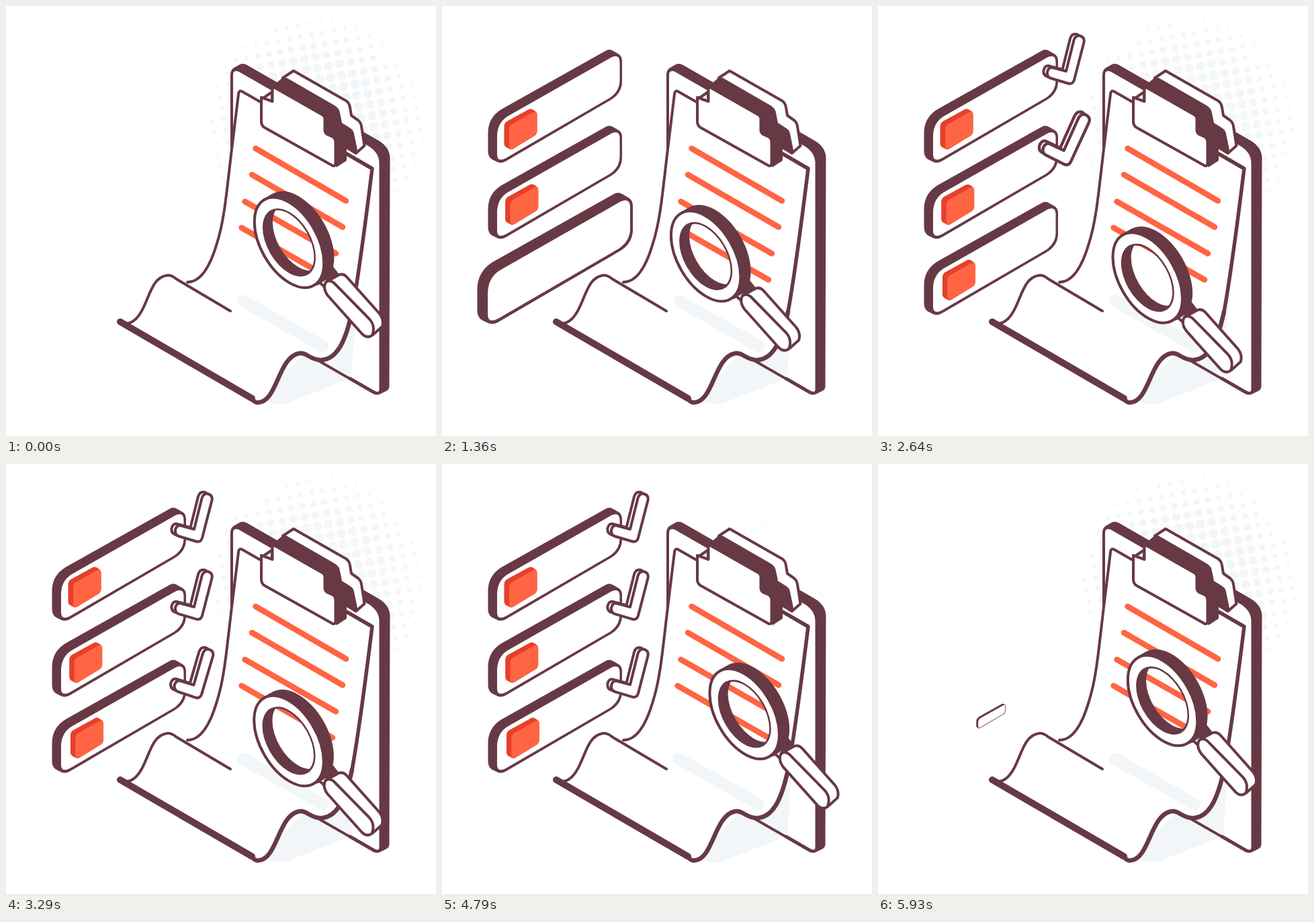
An HTML page that plays this animation: 640 by 640 pixels, repeating every 6000 ms.

```html
<!DOCTYPE html>
<html lang="en">
<head>
<meta charset="utf-8">
<title>Checklist review</title>
<style>
  html, body { margin: 0; width: 100%; height: 100%; overflow: hidden; background: #fff; }
  svg { display: block; width: 100vw; height: 100vh; }
  .dark { fill: #673945; }
  .white { fill: #fff; }
  .line { stroke: #673945; stroke-width: 4; stroke-linejoin: round; stroke-linecap: round; }
  .none { fill: none; }
  .pale { fill: #f2f6f9; }
  .ink { stroke: #ff6543; stroke-width: 8.5; stroke-linecap: round; }
</style>
</head>
<body>
<svg viewBox="0 0 640 640" xmlns="http://www.w3.org/2000/svg">
  <defs>
    <g id="bar">
      <path class="dark" d="M68.500 188Q69 166 88 154L243 67Q249 63 255 67L262 71Q268 74 268 82L268 112Q268 130 251 140L95 231Q88 235 82 232L74 228Q68.500 224 68.500 216Z"/>
      <path class="white" d="M82 192Q83 173 98 164L252 76.500Q264 71 264.500 83L264.500 112Q264 127 250 136.500L95 226.500Q82 233 82 221Z"/>
    </g>
    <g id="box">
      <path fill="#e6402b" d="M92.500 179Q92.500 175 96 172L127 155Q131 152 135 154L138 156Q141.500 158 141.500 162L141.500 186Q141.500 190 138 193L107 212Q103 215 99 212L95 210Q92.500 208 92.500 205Z"/>
      <path fill="#ff6543" d="M100 183Q100 178.500 104 176L136 158Q141.500 156 141.500 162L141.500 186Q141.500 190 138 193L106 212Q100 215 100 208Z"/>
    </g>
    <path id="tick" d="M259 91.500L280 97L291.500 51Q294 43 301 44.500Q308 47 306.500 54L292 110Q290 116.500 284 115.500L257 107.500Q251 105 252 98Q254 91 259 91.500Z"/>
    <g id="check" class="white line">
      <use href="#tick" x="-5.500" y="-2.500"/>
      <use href="#tick"/>
    </g>
    <clipPath id="frontHole"><ellipse rx="52.500" ry="30" transform="translate(421.500 352) rotate(60)"/></clipPath>
    <mask id="lens" maskUnits="userSpaceOnUse" x="340" y="250" width="260" height="260">
      <rect x="340" y="250" width="260" height="260" fill="#fff"/>
      <g clip-path="url(#frontHole)">
        <ellipse rx="54" ry="31" transform="translate(435 344.500) rotate(60)" fill="#000"/>
      </g>
    </mask>
  </defs>

  <g id="dots" class="pale"></g>

  <g id="board">
    <path class="dark" d="M334 102Q334 94 341 91L347 87.500Q353 84.500 359 88L554 200Q571.500 210 571.500 227L570.500 566Q570.500 571 566 573L556 578Q551 580 546 577L334 454Z"/>
    <path class="white" d="M338 103Q338 94 347 98L537 207Q555.500 217 555.500 234L555.500 571Q555 576 549 573L338 451Z"/>
    <path class="pale" d="M380 585Q400 596 416 592L508 556Q513 554 514 547L523 430L460 500Z"/>
    <path class="none line" d="M460 525L548 575.500"/>
  </g>

  <g id="paper">
    <path class="white" d="M347 127L337 205C329 268 326 316 314 353C305 384 292 411 270 411L253 404Q246 400 239 401C213 405 213 446 193 466Q184 474 172 470L372 590C404 594 405 523 436 517C448 515 452 527 470 527C497 525 508 487 515 455C526 396 537 306 546 242Z"/>
    <path class="none line" d="M379 143L351 127Q347 125 346 131L337 205C329 268 326 316 314 353C305 384 292 411 270 411M334 454L253 406Q246 400 239 401C213 405 213 446 193 466Q184 474 176 472"/>
    <path class="none line" style="stroke-width:10" d="M170 470L366 584"/>
    <path class="none line" style="stroke-width:6.500" d="M366 585Q371 591 376 590C404 588 405 523 436 517C448 515 452 527 470 527C497 525 508 487 515 455"/>
    <path class="none line" style="stroke-width:5.500" d="M515 455C526 396 537 306 545 242L507 220"/>
    <path class="none ink" d="M371.500 212L506 290M366 251L501 329M355.500 291L491 368.500M350.500 330L486 407.500"/>
    <path class="none" stroke="#f2f6f9" stroke-width="18" stroke-linecap="round" d="M353 439L471 506"/>
  </g>

  <g id="clip">
    <path class="white line" d="M412 107L428 96.500L506 141Q511 144 512 151L514 163L524 170Q528 173 529 179L533.500 208L521 219L480 190Z"/>
    <path class="dark" d="M395 121L410 108Q414 105 418 107L489 148Q496 152 497 159L500 174L511 181Q517 184 518 190L524 219L520 221L507 213L507 228Q507 231 504 232L492 240L470 200Z"/>
    <path class="white line" d="M380 139L396 128L396 142Z"/>
    <path class="white line" d="M380 136L396.500 142L396.500 122L400 121.500L471 162Q474.500 164 474.500 168L474.500 185Q475 189 478 191L487 195Q490.500 198 490.500 202L490.500 234Q490 240 485 237L385 181Q380 178 380 172Z"/>
  </g>

  <g id="items"></g>

  <g id="glass">
    <path class="white line" d="M455 416L468 400L480 408L476 420L467.500 412Z"/>
    <path class="dark" d="M470 398L487 388L498 402L478 411Z"/>
    <g mask="url(#lens)">
      <g id="rim" class="dark"></g>
      <ellipse class="white line" rx="73.500" ry="42" transform="translate(421.500 352) rotate(60)"/>
      <ellipse class="dark" rx="55.500" ry="32.500" transform="translate(421.500 352) rotate(60)"/>
    </g>
    <path class="white line" d="M476 411L494 401Q501 397 507 403L556 458Q563 467 560 477L546 489.500Q538 496 530 488L479 431Q471 420 476 411Z"/>
    <path class="none line" d="M476 411Q481 407 488 412L541 466Q550 476 545.500 489"/>
  </g>
</svg>
<script>
const LOOP = 6000, OVER = 1.19;
const $ = id => document.getElementById(id);

function add(parent, tag, attrs) {
  const el = document.createElementNS('http://www.w3.org/2000/svg', tag);
  for (const k in attrs) el.setAttribute(k, attrs[k]);
  return parent.appendChild(el);
}

// Value of a [time, value] table at time t
const sine = x => (1 - Math.cos(Math.PI * x)) / 2;
function track(t, keys, ease = x => x) {
  if (t <= keys[0][0]) return keys[0][1];
  for (let i = 1; i < keys.length; i++) {
    const [t0, a] = keys[i - 1], [t1, b] = keys[i];
    if (t <= t1) return a + (b - a) * ease((t - t0) / (t1 - t0));
  }
  return keys[keys.length - 1][1];
}

// Halftone disc: dots shrink towards the rim
for (let i = -12; i <= 12; i++) {
  for (let j = -12; j <= 12; j++) {
    const x = 16.5 * i + 3 * j, y = -3 * i + 16.5 * j;
    const r = Math.min(7, 0.077 * (184 - Math.hypot(x, y)));
    if (r > 1) add($('dots'), 'circle', { cx: 462 + x, cy: 178 + y, r });
  }
}

for (let i = 0; i <= 6; i++) {
  add($('rim'), 'ellipse', {
    rx: 75.3, ry: 43.8,
    transform: `translate(${421.5 + i * 2.25} ${352 - i * 1.25}) rotate(60)`
  });
}

const items = [];
function item(shape, cx, cy, dx, dy, start, peak, rest, outPeak, end, turn = 0) {
  items.push({
    el: add($('items'), 'use', { href: '#' + shape }), cx, cy, dx, dy, outPeak,
    grow: [[start, 0], [peak, OVER], [rest, 1], [5300, 1], [outPeak, OVER]],
    shrink: [[outPeak, OVER], [end, 0]],
    spin: [[peak, turn], [rest, 0]]
  });
}
for (let i = 0; i < 3; i++) {
  const p = 200 + 590 * i, c = 1930 + 535 * i, end = i < 2 ? 5922 : 5965;
  item('bar', 168, 148.5, 0, 113.2 * i, p - 190, p, p + 300, 5780, end);
  item('box', 117, 183.5, 1.7 * i, 112.2 * i, p + 180, p + 390, p + 590, 5760, 5915);
  item('check', 276.5, 78.5, 0, 115.7 * i, c - 220, c, c + 370, 5760, 5915, 19);
}

// Angle of the glass on its round path, in degrees
const orbit = [[0, 0], [790, 42], [1930, 100], [2570, 134], [3290, 179],
  [3860, 228], [4210, 253], [4500, 272], [5140, 311], [6000, 360]];

function draw(t) {
  for (const o of items) {
    const s = t < o.outPeak ? track(t, o.grow, sine) : track(t, o.shrink);
    const r = track(t, o.spin, sine);
    o.el.setAttribute('visibility', s > 0.005 ? 'visible' : 'hidden');
    o.el.setAttribute('transform',
      `translate(${o.cx + o.dx} ${o.cy + o.dy}) rotate(${r}) scale(${s}) translate(${-o.cx} ${-o.cy})`);
  }
  const a = track(t, orbit) * Math.PI / 180;
  $('glass').setAttribute('transform',
    `translate(${-30.5 * Math.sin(a)} ${30 * (1 - Math.cos(a))})`);
  const glow = 0.5 + 0.5 * Math.cos(4 * Math.PI * t / LOOP);
  $('dots').setAttribute('opacity', glow ** 1.4);
}

const begin = performance.now();
function tick() {
  draw((performance.now() - begin) % LOOP);
  requestAnimationFrame(tick);
}
tick();
</script>
</body>
</html>
```
